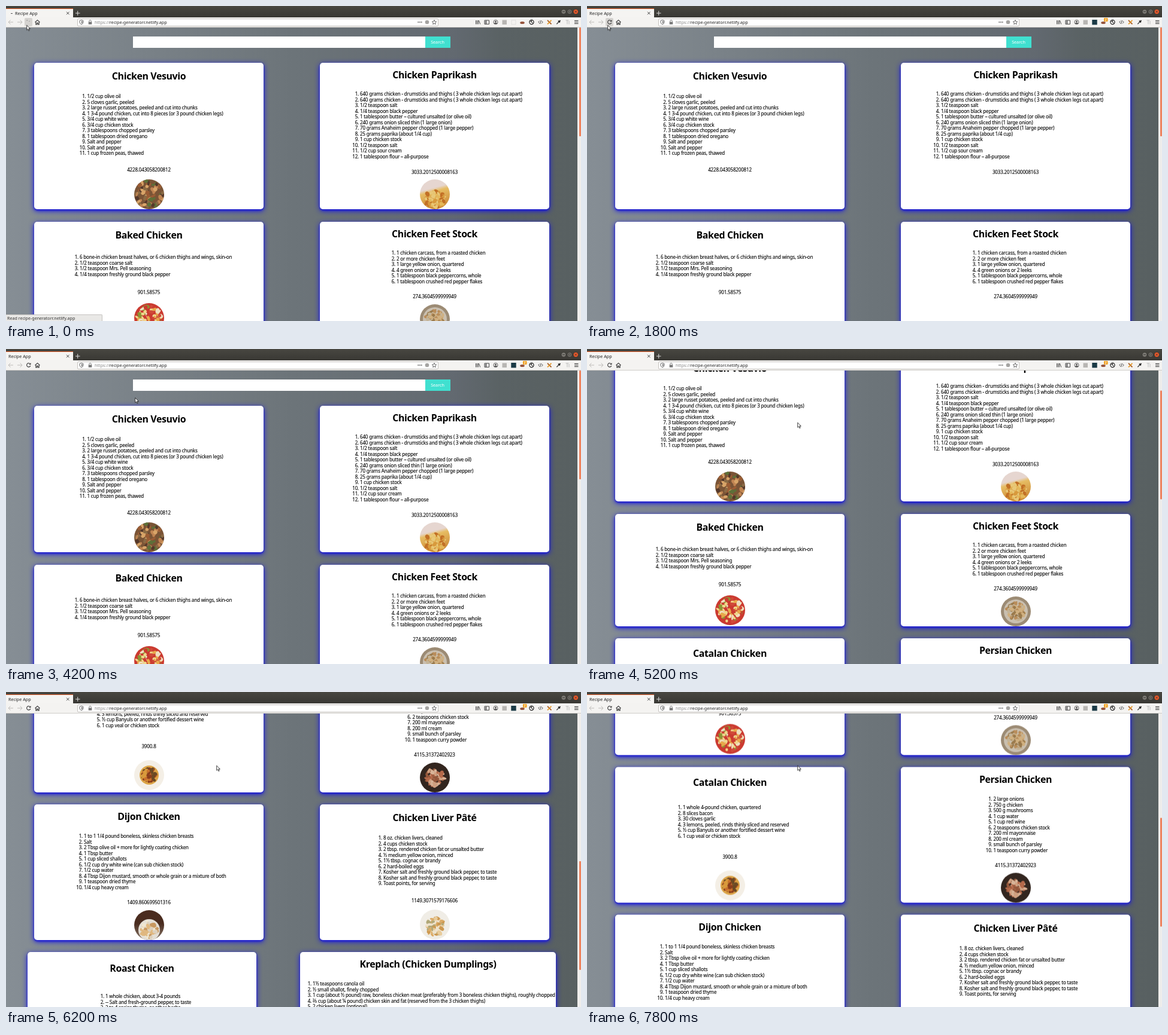
These frames come from a looping animation (960x527 px, 8 s). An HTML page:

```html
<!DOCTYPE html>
<html lang="en">
<head>
<meta charset="utf-8">
<title>Recipe App</title>
<style>
@property --s { syntax: "<number>"; inherits: true; initial-value: 0; }
html, body { margin: 0; width: 100%; height: 100%; overflow: hidden; }
#stage {
  position: relative; width: 960px; height: 527px; overflow: hidden;
  font: 8px/9.5px "Noto Sans", "Open Sans", sans-serif; color: #000;
  background: linear-gradient(90deg, #868e95, #6c7479 50%, #626970 78%, #5a6264 86%, #586061);
}
#stage * { position: absolute; box-sizing: border-box; }
#stage .anim, .photo { animation: 8s step-end infinite; }

#view { inset: 36px 0 0; overflow: hidden; animation: scroll 8s step-end infinite; }
#page { left: 0; top: -36px; width: 954px; height: 1312px; transform: translateY(calc(var(--s) * -1px)); }
#stage #search { top: 51px; height: 18.5px; background: #fff; animation-name: search; }
#search b {
  right: 0; width: 42px; height: 100%; background: #40e0d0; color: #fff;
  font: 7.2px/18px "Noto Sans", sans-serif; text-align: center;
}
#stage #cards, #stage #bar { animation-name: cards; }
#cards { letter-spacing: -.155px; -webkit-text-stroke: .1px #000; }
.card { background: #fff; border-radius: 5px; box-shadow: 0 2px 3px #2020cc, 0 2.5px 10px #1010f0; }
#stage .mid { transform: translate(-50%, -50%); white-space: nowrap; }
h1.mid { margin: 0; font-size: 15.9px; line-height: 20px; letter-spacing: -.37px; -webkit-text-stroke: 0; }
ol { margin: 0; padding: 0; white-space: nowrap; }
#stage li { position: relative; }
.photo { width: 50px; height: 50px; border-radius: 50%; overflow: hidden; animation-name: early; }
.photo.late { animation-name: late; }
#bar { right: 0; top: 0; width: 6px; height: 100%; background: #efedeb; }
#thumb { right: 0; width: 3px; height: 182px; background: #ee8460; border-radius: 1px; transform: translateY(calc(var(--s) * .3935px)); }

#status {
  left: 0; bottom: 0; width: 161px; height: 11px; padding-left: 2px; background: #e9e8e6;
  border: 1px solid #c5c3c0; border-width: 1px 1px 0 0; border-radius: 0 2px 0 0;
  font-size: 7.1px; line-height: 10.5px; color: #333;
}
#stage #status { animation-name: status; }
#title { left: 0; top: 0; width: 100%; height: 19px; background: linear-gradient(#484741, #393834); }
#tab { left: 0; top: 4px; width: 112px; height: 15px; background: #f5f4f2; border-top: 1px solid #e8622c; overflow: hidden; }
#stage #burst { left: 9px; top: 7px; width: 68px; height: 68px; margin: -34px; border-radius: 50%; background: #a9d0ef; animation-name: burst; }
.ui { font-size: 7.2px; line-height: 10px; white-space: nowrap; color: #222; }
#stage #name { top: 2px; animation-name: name; }
#stage #dot { left: 8px; top: 6.5px; width: 3px; height: 1px; background: #555; animation-name: dot; }
#tools { left: 0; top: 19px; width: 100%; height: 17px; background: #f4f3f1; border-bottom: 1px solid #cfccc8; }
#url { left: 118.5px; top: 20.5px; width: 603px; height: 13.5px; background: #fff; border: .5px solid #c6c3bf; border-radius: 2px; }
#address { left: 148px; top: 22.3px; }
#stage #address span { position: static; color: #888; }
#icons { left: 0; top: 0; }
#stage #hover { left: 31px; top: 20px; width: 13px; height: 14px; border-radius: 2px; background: #d5d3d0; animation-name: hover; }
#stage #stop { animation-name: stop; }
#stage #reload { animation-name: reload; }
#stage #half { animation-name: half; }
#stage #ext { animation-name: ext; }
#stage #ghost { animation-name: ghost; }
#stage #badge { animation-name: badge; }
#stage #mouse { left: 0; top: 0; animation-name: mouse; }

@keyframes cards { 0% { visibility: visible } 2.5% { visibility: hidden } 22.5%, to { visibility: visible } }
@keyframes early { 0% { opacity: 1 } 2.5% { opacity: 0 } 25%, to { opacity: 1 } }
@keyframes late { 0% { opacity: 1 } 2.5% { opacity: 0 } 27.5%, to { opacity: 1 } }
@keyframes search {
  0% { left: 212px; width: 529.5px } 2.5% { left: 214px; width: 532px }
  22.5%, to { left: 212px; width: 529.5px }
}
@keyframes status { 0% { opacity: 1 } 5%, to { opacity: 0 } }
@keyframes name { 0% { left: 15px } 15%, to { left: 4px } }
@keyframes dot { 0% { opacity: 1 } 7.5%, to { opacity: 0 } }
@keyframes burst {
  0% { opacity: 0; transform: scale(.4) } 7.5% { opacity: 1; transform: scale(.4) }
  10% { opacity: 1; transform: none } 12.5% { opacity: .45; transform: scale(2.4) }
  15%, to { opacity: 0; transform: scale(3) }
}
@keyframes hover { 0% { opacity: 1 } 2.5% { opacity: 0 } 17.5% { opacity: 1 } 32.5%, to { opacity: 0 } }
@keyframes half { 0% { opacity: 1 } 2.5%, to { opacity: 0 } }
@keyframes stop { 0% { opacity: 0 } 2.5% { opacity: 1 } 17.5%, to { opacity: 0 } }
@keyframes reload { 0% { opacity: 0 } 17.5%, to { opacity: 1 } }
@keyframes ghost { 0% { opacity: 1 } 7.5%, to { opacity: 0 } }
@keyframes ext { 0% { opacity: 0 } 7.5%, to { opacity: 1 } }
@keyframes badge { 0% { opacity: 0 } 22.5%, to { opacity: 1 } }
@keyframes mouse {
  0% { transform: translate(34px, 31.5px) }
  32.5% { transform: translate(52px, 42px) }
  35% { transform: translate(110px, 60px) }
  37.5% { transform: translate(205px, 75px) }
  40% { transform: translate(325px, 85px) }
  42.5% { transform: translate(403px, 88px) }
  52.5% { transform: translate(215px, 81px) }
  55% { transform: translate(110px, 73px) }
  57.5% { transform: translate(220px, 95px) }
  60%, to { transform: translate(351px, 122.5px) }
}
@keyframes scroll {
  0% { --s: 0 } 65% { --s: 85 } 67.5% { --s: 228 } 70% { --s: 371 } 72.5% { --s: 485 }
  75% { --s: 590 } 77.5% { --s: 628 } 82.5% { --s: 590 } 85% { --s: 571 }
  95% { --s: 514 } 97.5%, to { --s: 443.5 }
}
</style>
</head>
<body>
<div id="stage">
  <div id="view">
    <div id="page">
      <div id="search" class="anim"><b>Search</b></div>
      <div id="cards" class="anim"></div>
    </div>
    <div id="bar" class="anim"><div id="thumb"></div></div>
  </div>
  <div id="status" class="anim">Read recipe-generatorr.netlify.app</div>

  <div id="title"></div>
  <div id="tab">
    <div id="burst" class="anim"></div>
    <div id="dot" class="anim"></div>
    <div id="name" class="anim ui">Recipe App</div>
  </div>
  <div id="tools"></div>
  <div id="url"></div>
  <div id="address" class="ui"><span>https://</span>recipe-generatorr.netlify.app</div>
  <div id="hover" class="anim"></div>

  <svg id="icons" width="960" height="36" fill="none" stroke="#444" stroke-width="1">
    <path d="M101 9.7l4.6 4.6m0-4.6l-4.6 4.6"/>
    <path d="M116 12h7.5M119.7 8.2v7.6" stroke="#ddd"/>
    <g stroke="#33322e" stroke-width=".8">
      <circle cx="931" cy="9.5" r="4" fill="#7c7a74"/><path d="M929 9.5h4"/>
      <circle cx="941" cy="9.5" r="4" fill="#7c7a74"/><path d="M939.3 8h3.4v3h-3.4z"/>
      <circle cx="951.3" cy="9.5" r="4.2" fill="#e9592b"/><path d="M949.7 7.9l3.2 3.2m0-3.2l-3.2 3.2"/>
    </g>
    <path d="M12 27H4m3.5-3.5L4 27l3.5 3.5M19 27h8m-3.5-3.5L27 27l-3.5 3.5" stroke="#bdbbb8"/>
    <path id="half" class="anim" d="M34.5 24h1.5m2.5 1.5h1" stroke="#777"/>
    <path id="stop" class="anim" d="M34.5 24l6 6m0-6l-6 6" stroke="#aaa"/>
    <g id="reload" class="anim"><path d="M40.5 25.2a3.2 3.2 0 1 0 .3 2.8" stroke-width="1.2"/><path d="M41.5 23v3.3h-3.3z" fill="#444" stroke="none"/></g>
    <path d="M48.5 27.2l4-3.7 4 3.7M49.8 26.8v4h1.8v-2.5h1.8v2.5h1.8v-4" stroke-width="1.2"/>
    <path d="M126 23.5l3 1v2.5q0 2.5-3 4-3-1.5-3-4v-2.5z" stroke-width=".8"/><path d="M126 25v4.5q1.5-1 1.5-2.5v-1.5z" fill="#555" stroke="none"/>
    <path d="M138.8 27v-1.7a1.7 1.7 0 0 1 3.4 0V27" stroke="#777"/><path d="M137.7 26.7h5.6v4h-5.6z" fill="#777" stroke="none"/>
    <path d="M687.5 27h1.6m1.1 0h1.6m1.1 0h1.6" stroke-width="1.6"/>
    <circle cx="703" cy="27" r="3.3" fill="#a5a4a2" stroke="none"/>
    <path d="M715 23.4l1.1 2.5 2.6.3-2 1.8.6 2.6-2.3-1.3-2.3 1.3.6-2.6-2-1.8 2.6-.3z" stroke-width=".8"/>
    <path d="M784.5 24v6.5m2-6.5v6.5m2-6.5v6.5m1-6.3l2.2 6.3"/>
    <path d="M799 24h7.5v6.3H799zm3 0v6.3"/><path d="M799.5 24.5h2.5v5.5h-2.5z" fill="#888" stroke="none"/>
    <circle cx="817.5" cy="27" r="3.6" stroke-width=".8"/><circle cx="817.5" cy="26" r="1.3" fill="#444" stroke="none"/><path d="M815.3 29.2q2.2-2.5 4.4 0z" fill="#444"/>
    <rect x="828.5" y="23.5" width="7.5" height="7.5" fill="#b8b6b3" stroke="none"/>
    <rect id="ghost" class="anim" x="844" y="23.8" width="7" height="7" stroke="#ccc" stroke-dasharray="1"/>
    <rect id="ext" class="anim" x="843.3" y="23" width="8.4" height="8.4" fill="#1b3a46" stroke="none"/>
    <ellipse cx="862" cy="28" rx="3.8" ry="2" fill="#94523a" stroke="none"/>
    <g id="badge" class="anim"><rect x="863" y="20" width="6.5" height="6" rx="1" fill="#f0a01e" stroke="none"/><path d="M865.3 21.5h1.7v1.5h-1.7v1.5h1.8" stroke="#fff" stroke-width=".6"/></g>
    <circle cx="877.5" cy="27" r="3.6" stroke="#222" stroke-width="1.2"/><path d="M875 25l5 4m-2.5-5v3" stroke="#222"/>
    <path d="M891 24.7L888.7 27l2.3 2.3m3-4.6l2.3 2.3-2.3 2.3m-.8-5.3l-1.5 6" stroke-width=".9"/>
    <path d="M904 23.8l6.5 6.5" stroke="#a55a20" stroke-width="1.8"/><path d="M910.5 23.8l-6.5 6.5" stroke="#e59a2c" stroke-width="1.8"/>
    <path d="M919.3 30.3l3.7-3.7" stroke-width="1.4"/><path d="M922 24.7l2.8 2.8m-1-1.6l1.7-1.7" stroke="#222" stroke-width="1.8"/>
    <path d="M934.5 24h5m-2.5 0v6.5m3-5.5v5.5" stroke="#bbb"/>
    <path d="M949 24.5h6.5m-6.5 2.5h6.5m-6.5 2.5h6.5" stroke="#333"/>
  </svg>

  <svg id="mouse" class="anim" width="9" height="13"><path d="M.7.7v8l1.9-1.7 1.3 3 1.3-.6-1.3-2.9h2.5z" fill="#fff" stroke="#111" stroke-width=".8"/></svg>
</div>

<script>
// col: x and width; y: top and bottom; then the centre lines of the parts
const LEFT = [47, 383], RIGHT = [524, 383];
const cards = [
  { col: LEFT, y: [95, 340], title: ["Chicken Vesuvio", 116.5], list: [135.5, 151], num: ["4228.043058200812", 274], pic: 314.5,
    food: ["#7a5436", "#9a5c34 #c08452 #5d7038 #d8a468 #54382a #8a6a44", 23],
    items: "1/2 cup olive oil|5 cloves garlic, peeled|2 large russet potatoes, peeled and cut into chunks|1 3-4 pound chicken, cut into 8 pieces (or 3 pound chicken legs)|3/4 cup white wine|3/4 cup chicken stock|3 tablespoons chopped parsley|1 tablespoon dried oregano|Salt and pepper|Salt and pepper|1 cup frozen peas, thawed" },
  { col: RIGHT, y: [95, 340], title: ["Chicken Paprikash", 115], list: [591, 147], num: ["3033.2012500008163", 277.5], pic: 315,
    food: ["linear-gradient(165deg, #e6d6d0 32%, #e6bc62 42%, #c47a2a)", "#e4b85a #d89a3c #c27026 #e8c878", 16, 8],
    items: "640 grams chicken - drumsticks and thighs ( 3 whole chicken legs cut apart)|640 grams chicken - drumsticks and thighs ( 3 whole chicken legs cut apart)|1/2 teaspoon salt|1/4 teaspoon black pepper|1 tablespoon butter – cultured unsalted (or olive oil)|240 grams onion sliced thin (1 large onion)|70 grams Anaheim pepper chopped (1 large pepper)|25 grams paprika (about 1/4 cup)|1 cup chicken stock|1/2 teaspoon salt|1/2 cup sour cream|1 tablespoon flour – all-purpose" },
  { col: LEFT, y: [360.5, 549], title: ["Baked Chicken", 383], list: [123, 420], num: ["901.58575", 479], pic: 522,
    food: ["#cb3a30", "#f0d68a #e8a84a #d04a38 #f0e0c0 #cb3a30 #8a9434", 20],
    items: "6 bone-in chicken breast halves, or 6 chicken thighs and wings, skin-on|1/2 teaspoon coarse salt|1/2 teaspoon Mrs. Pell seasoning|1/4 teaspoon freshly ground black pepper" },
  { col: RIGHT, y: [360.5, 549], title: ["Chicken Feet Stock", 381], list: [652, 413], num: ["274.3604599999949", 486], pic: 524,
    food: ["#9c8b74", "#b98d5a #9a7a4c #d0b080 #c4b498", 15, 0, "#c9bfb0"],
    items: "1 chicken carcass, from a roasted chicken|2 or more chicken feet|1 large yellow onion, quartered|4 green onions or 2 leeks|1 tablespoon black peppercorns, whole|1 tablespoon crushed red pepper flakes" },
  { col: LEFT, y: [569, 796], title: ["Catalan Chicken", 594], list: [160, 636], num: ["3900.8", 718.5], pic: 767,
    food: ["#f4efe6", "#8a3d1c #6a4a24 #c8702c #d99a3c", 11, 0, "#dca548"],
    items: "1 whole 4-pound chicken, quartered|8 slices bacon|30 cloves garlic|3 lemons, peeled, rinds thinly sliced and reserved|½ cup Banyuls or another fortified dessert wine|1 cup veal or chicken stock" },
  { col: RIGHT, y: [569, 796], title: ["Persian Chicken", 589], list: [678.5, 622], num: ["4115.31372402923", 733], pic: 771,
    food: ["#33261f", "#b5694a #d0a080 #94563a #d8b498", 15],
    items: "2 large onions|750 g chicken|500 g mushrooms|1 cup water|1 cup red wine|2 teaspoons chicken stock|200 ml mayonnaise|200 ml cream|small bunch of parsley|1 teaspoon curry powder" },
  { col: LEFT, y: [816, 1043], title: ["Dijon Chicken", 836], list: [130, 869], num: ["1409.860699501316", 980], pic: 1018,
    food: ["linear-gradient(#4a2c1f 45%, #8a7a6c)", "#e0b880 #c89860 #f0e6d0 #ddd0bc", 13, 8, "#e4dfd6"],
    items: "1 to 1 1/4 pound boneless, skinless chicken breasts|Salt|2 Tbsp olive oil + more for lightly coating chicken|1 Tbsp butter|1 cup sliced shallots|1/2 cup dry white wine (can sub chicken stock)|1/2 cup water|4 Tbsp Dijon mustard, smooth or whole grain or a mixture of both|1 teaspoon dried thyme|1/4 cup heavy cream" },
  { col: RIGHT, y: [816, 1043], title: ["Chicken Liver Pâté", 838], list: [630, 872], num: ["1149.3071579176606", 976.5], pic: 1017,
    food: ["#f0ede6", "#dcac68 #cc9850 #e8cc9c #eee2cc #b0a878", 15, 3],
    items: "8 oz. chicken livers, cleaned|4 cups chicken stock|2 tbsp. rendered chicken fat or unsalted butter|½ medium yellow onion, minced|1½ tbsp. cognac or brandy|2 hard-boiled eggs|Kosher salt and freshly ground black pepper, to taste|Kosher salt and freshly ground black pepper, to taste|Toast points, for serving" },
  { col: [36, 382], y: [1063, 1292], title: ["Roast Chicken", 1090], list: [166, 1137],
    items: "1 whole chicken, about 3-4 pounds|-- Salt and fresh-ground pepper, to taste|2 to 4 sprigs thyme, or other herbs" },
  { col: [491, 427], y: [1063, 1292], title: ["Kreplach (Chicken Dumplings)", 1083], list: [512, 1116],
    items: "1½ teaspoons canola oil|½ small shallot, finely chopped|1 cup (about ½ pound) raw, boneless chicken meat (preferably from 3 boneless chicken thighs), roughly chopped|⅔ cup (about ¼ pound) chicken skin and fat (reserved from the 3 chicken thighs)|2 chicken livers (optional)" }
];

function seeded(seed) {
  return () => (seed = (seed * 16807) % 2147483647) / 2147483647;
}

// a dish as overlapping blobs of its main tones
function dish([base, tones, spread, drop = 0, plate], seed) {
  const rnd = seeded(seed * 7919 + 11), palette = tones.split(" ");
  let shapes = plate ? `<circle cy="${drop}" r="${spread + 5}" fill="${plate}"/>` : "";
  for (let i = 0; i < 70; i++) {
    const a = rnd() * 6.283, d = Math.sqrt(rnd()) * spread;
    shapes += `<ellipse rx="${2 + rnd() * 3}" ry="${1.5 + rnd() * 2}" fill="${palette[i % palette.length]}"
      transform="translate(${d * Math.cos(a)} ${drop + d * Math.sin(a)}) rotate(${rnd() * 180})"/>`;
  }
  return `<svg width="50" height="50" viewBox="-25 -25 50 50" style="background:${base}">${shapes}</svg>`;
}

const mid = (tag, x, [text, y]) => `<${tag} class="mid" style="left:${x}px;top:${y}px">${text}</${tag}>`;

document.getElementById("cards").innerHTML = cards.map((c, i) => {
  const [x, w] = c.col, [top, bottom] = c.y, cx = x + w / 2;
  return `<div class="card" style="left:${x}px;width:${w}px;top:${top}px;height:${bottom - top}px"></div>`
    + mid("h1", cx, c.title)
    + `<ol style="left:${c.list[0]}px;top:${c.list[1] - 4.75}px">${c.items.split("|").map(s => `<li>${s}</li>`).join("")}</ol>`
    + (c.num ? mid("div", cx, c.num) : "")
    + (c.food ? `<div class="photo${i % 2 ? " late" : ""}" style="left:${cx - 25}px;top:${c.pic - 25}px">${dish(c.food, i + 1)}</div>` : "");
}).join("");
</script>
</body>
</html>
```
